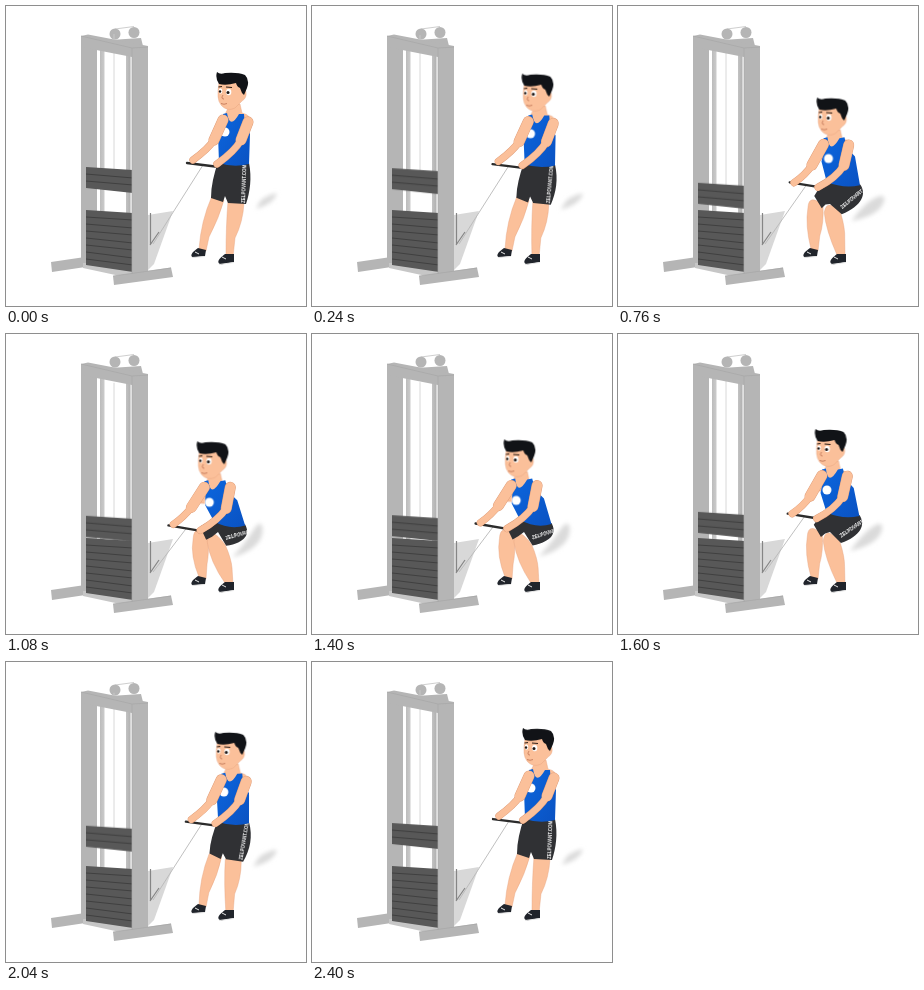
Animation of 300x300 px, one loop 2.44 s. Source, as an HTML page without scripts:

```html
<!DOCTYPE html>
<html lang="en">
<head>
<meta charset="utf-8">
<title>Cable squat</title>
<style>
html, body { margin: 0; width: 100%; height: 100%; overflow: hidden; background: #fff; }
svg { display: block; width: 100vw; height: 100vh; }

/* Each moving part has three poses: --a standing, --m halfway, --b squatting. */
.morph { animation: morph 2440ms infinite; }
.move { animation: move 2440ms infinite; }
@keyframes morph {
  0% { d: var(--a); animation-timing-function: cubic-bezier(.543, 0, .794, .5); }
  28.4% { d: var(--m); animation-timing-function: cubic-bezier(.281, .5, .502, 1); }
  48.4% { d: var(--b); animation-timing-function: cubic-bezier(.573, 0, .75, .5); }
  70% { d: var(--m); animation-timing-function: cubic-bezier(.174, .5, .398, 1); }
  100% { d: var(--a); }
}
@keyframes move {
  0% { transform: var(--a); animation-timing-function: cubic-bezier(.543, 0, .794, .5); }
  28.4% { transform: var(--m); animation-timing-function: cubic-bezier(.281, .5, .502, 1); }
  48.4% { transform: var(--b); animation-timing-function: cubic-bezier(.573, 0, .75, .5); }
  70% { transform: var(--m); animation-timing-function: cubic-bezier(.174, .5, .398, 1); }
  100% { transform: var(--a); }
}

.weights { --a: translate(0, 0); --m: translate(0, 14px); --b: translate(0, 21px); }
.head { --a: translate(0, 0); --m: translate(-9px, 20px); --b: translate(-20px, 42px); }
.badge { --a: translate(219px, 126px); --m: translate(213px, 147px); --b: translate(203px, 169px); }
.label {
  --a: translate(239px, 197px) rotate(-88deg);
  --m: translate(226px, 202px) rotate(-48deg);
  --b: translate(220px, 206px) rotate(-14deg);
  font: bold 4.5px "Liberation Sans", Arial, sans-serif; fill: #fff;
}
.shadow {
  --a: path("M250 203Q255 192 260 191Q269 186 271 188Q267 198 250 203Z");
  --m: path("M236 212Q245 198 254 194Q269 187 270 192Q267 207 236 212Z");
  --b: path("M226 224Q240 208 246 198Q254 184 256 194Q258 214 226 224Z");
}
.shirt {
  --a: path("M221 107Q224 124 233 108L238 108Q238 118 244 128L243 158Q228 162 213 157L212 128Q217 120 217 108Z");
  --m: path("M212 126Q214 144 224 127L229 126Q230 136 239 145L243 175Q226 178 209 172L205 150Q209 140 208 127Z");
  --b: path("M202 147Q204 165 214 148L219 147Q221 159 231 167L239 192Q224 197 208 188L199 172Q200 160 198 148Z");
}
.shorts {
  --a: path("M212 156L243 157C246 172 244 186 240 198L222 197L219 190L217 196L205 192C205 180 208 168 212 156Z");
  --m: path("M210 172L243 174C251 184 245 197 225 207L212 198L208 197L205 201L197 189C200 182 204 177 210 172Z");
  --b: path("M208 187L239 191C244 200 240 209 220 212L212 198L206 203L200 206L194 193C198 190 202 188 208 187Z");
}
.shin-far {
  --a: path("M206 190Q212 188 218 194Q213 212 203 231L200 245L193 243Q195 215 206 190Z");
  --m: path("M191 200Q192 187 206 198Q207 216 202 230L200 245L193 243Q188 218 191 200Z");
  --b: path("M187 205Q188 189 202 203Q203 220 201 230L200 245L193 243Q184 222 187 205Z");
}
.shin-near {
  --a: path("M222 195Q230 192 238 197Q237 216 229 232L227 251L220 249Q220 220 222 195Z");
  --m: path("M208 206Q211 192 224 206Q228 222 227 232L227 251L219 249Q209 222 208 206Z");
  --b: path("M201 208Q203 189 219 211Q225 224 226 234L227 251L219 249Q204 228 201 208Z");
}
.upper-far {
  --a: path("M217 114L208 134");
  --m: path("M208 133L197 154");
  --b: path("M198 154L185 174");
}
.fore-far {
  --a: path("M208 134Q202 143 187 154");
  --m: path("M197 154Q191 164 179 172");
  --b: path("M185 174Q178 183 167 191");
}
.upper-near {
  --a: path("M242 116L235 134");
  --m: path("M233 134L228 154");
  --b: path("M224 154L220 175");
}
.fore-near {
  --a: path("M235 134Q229 145 211 158");
  --m: path("M228 154Q220 167 202 176");
  --b: path("M220 175Q212 187 194 197");
}
.bar {
  --a: path("M181 157L213 161");
  --m: path("M175 171L207 176");
  --b: path("M162 192L197 198");
}
.cable {
  --a: path("M147 238L197 159");
  --m: path("M147 238L191 174");
  --b: path("M147 238L180 195");
}

.skin { fill: #fbc09a; stroke: #e29f7b; stroke-width: .4; }
.arm { fill: none; stroke: #fbc09a; stroke-linecap: round; }
.edge { stroke: #dd9a76; }
.dark { fill: #585858; }
.seam { fill: none; stroke: #404040; stroke-width: 1; }
.steel { fill: #b5b5b5; }
</style>
</head>
<body>
<svg viewBox="0 0 300 300">
  <defs>
    <linearGradient id="rod">
      <stop stop-color="#bcbcbc"/><stop offset=".5" stop-color="#f0f0f0"/><stop offset="1" stop-color="#b0b0b0"/>
    </linearGradient>
    <linearGradient id="blue" x2="1" y2="1">
      <stop stop-color="#0c66de"/><stop offset="1" stop-color="#0a52c2"/>
    </linearGradient>
    <filter id="soft" x="-50%" y="-50%" width="200%" height="200%"><feGaussianBlur stdDeviation="2"/></filter>
    <clipPath id="side"><path class="morph shorts"/></clipPath>
  </defs>

  <!-- Machine -->
  <path d="M142 209L167 205L148 258L142 264Z" fill="#d8d8d8"/>
  <path d="M109 23L128 20.500" stroke="#cfcfcf"/>
  <g class="steel">
    <circle cx="109" cy="28" r="5.500"/><circle cx="128" cy="26.500" r="5.500"/>
    <path d="M104 34L135 32L137 40L112 38Z"/>
    <path d="M45 256L79 251L86 254V260L46 266Z"/>
    <path d="M77 255L128 266V273L77 262Z" fill="#c6c6c6"/>
    <path d="M75 31H91V257H75Z"/>
  </g>
  <path d="M94 44h4.500V206h-4.500zM120 48h4.500V208h-4.500z" fill="url(#rod)"/>
  <path class="dark" d="M80 204L127 207V266L80 259Z"/>
  <path class="seam" d="M80 211L127 214M80 218L127 222M80 225L127 229M80 232L127 237M80 239L127 244M80 246L127 252M80 253L127 259"/>
  <g class="move weights">
    <path d="M108 28V163" stroke="#cfcfcf" stroke-width=".8"/>
    <path class="dark" d="M80 161L127 164V187L80 182Z"/>
    <path class="seam" d="M80 168L127 172M80 175L127 179"/>
  </g>
  <g class="steel">
    <path d="M75 30L82 28.500L142 40V52L126 51L75 41Z"/>
    <path d="M126 43L142 41V267L126 270Z"/>
    <path d="M107 270L165 261.500L167 271L108 279Z"/>
  </g>
  <path d="M75 30L126 42L142 41M126 42V268M107 270L165 262" fill="none" stroke="#a6a6a6" stroke-width=".7"/>
  <path d="M144.500 207V238M144 239L153 226" fill="none" stroke="#858585" stroke-width="1.200"/>

  <path class="morph shadow" fill="#dadada" filter="url(#soft)"/>
  <path class="morph cable" fill="none" stroke="#b8b8b8" stroke-width=".9"/>

  <!-- Athlete -->
  <path class="morph shin-far skin"/>
  <path class="morph shin-near skin"/>
  <g fill="#20242b">
    <path d="M192 242L200 244L199 250L187 251.500Q182 249 192 242Z"/>
    <path d="M219 248L228 248L228 256L215 258.500Q208 256 219 248Z"/>
  </g>
  <path d="M186 251.500L199 250.500M213 258.500L228 256.500M189 246L193 248M216 251L220 253" stroke="#e8e8e8"/>

  <path class="morph shorts" fill="#303134"/>
  <g clip-path="url(#side)"><text class="move label">ZELPOVANT.COM</text></g>

  <path class="move head skin" d="M223 98L234 98L236 107Q246 109 246 119L240 129L214 128L213 113Q221 109 223 98Z"/>
  <path class="morph shirt" fill="url(#blue)"/>
  <circle class="move badge" r="4.500" fill="#fff"/>

  <path class="morph bar" fill="none" stroke="#2b2b2b" stroke-width="2.300" stroke-linecap="round"/>
  <g class="arm">
    <g class="edge">
      <path class="morph upper-far" stroke-width="11"/><path class="morph fore-far" stroke-width="7.300"/>
    </g>
    <path class="morph upper-far" stroke-width="10.200"/><path class="morph fore-far" stroke-width="6.500"/>
    <g class="edge">
      <path class="morph upper-near" stroke-width="11"/><path class="morph fore-near" stroke-width="7.300"/>
    </g>
    <path class="morph upper-near" stroke-width="10.200"/><path class="morph fore-near" stroke-width="6.500"/>
  </g>

  <g class="move head">
    <path class="skin" d="M213 77Q210 93 215 99Q221 106 229 102L236 95Q241 92 240 86L237 76Z"/>
    <path d="M213 78Q209 72 211 66Q214 69 219 67Q232 66 239 69Q244 74 241 82L238 89L236 87L234 82Q231 81 230 77Q220 80 213 78Z" fill="#111317"/>
    <g fill="#fff"><ellipse cx="214.500" cy="85" rx="1.800" ry="2.700"/><ellipse cx="222.700" cy="86" rx="2.600" ry="3.200"/></g>
    <g fill="#1b1512"><circle cx="214" cy="85.500" r="1.200"/><circle cx="222" cy="86.500" r="1.500"/></g>
    <path d="M212.500 81L216 80.500M220 81L226 81.500" stroke="#2a1c15" stroke-width="1.200"/>
    <path d="M217 89Q214.500 93 218 93M215 97.500Q218 99 221 97.500" fill="none" stroke="#c47a5b" stroke-width=".9"/>
  </g>
</svg>
</body>
</html>
```
